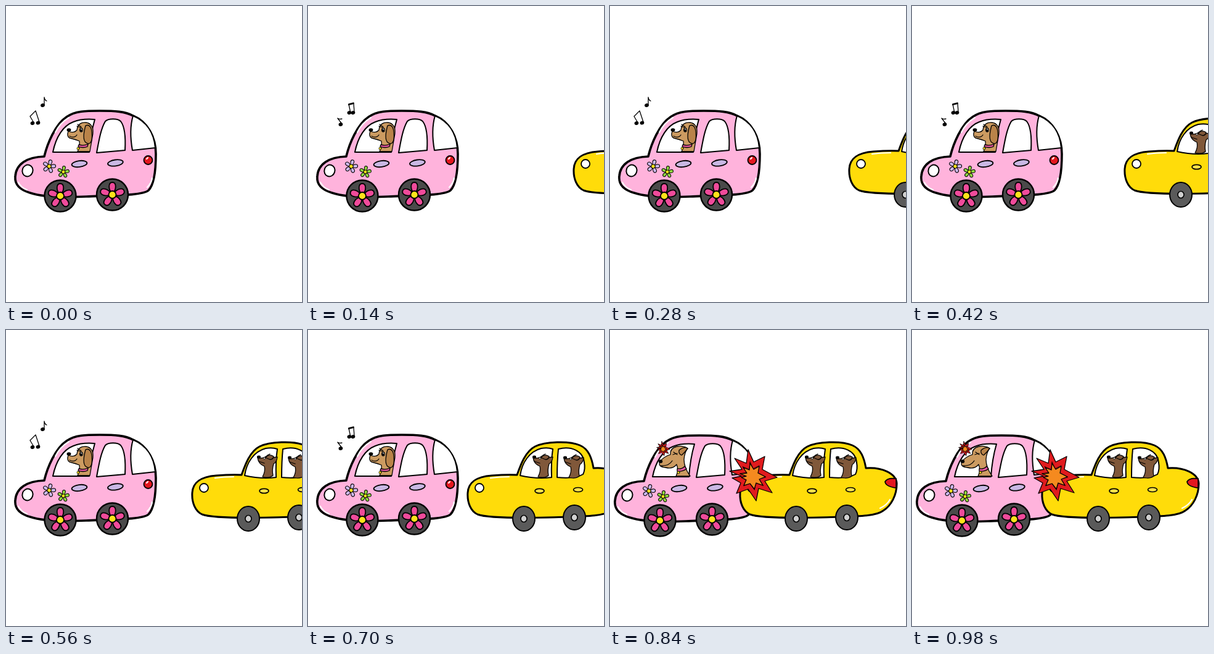
These frames come from a looping animation (480 px wide and 480 px high, 1.12 s). An HTML page:

```html
<!DOCTYPE html>
<html lang="en">
<head>
<meta charset="utf-8">
<title>Little car bump</title>
<style>
html, body { margin: 0; width: 100%; height: 100%; overflow: hidden; background: #fff; }
svg { display: block; width: 100vw; height: 100vh; }
.line { fill: none; }
.shine { fill: none; stroke: #fff; stroke-width: 2.2; }
.glass { fill: #fff; stroke-width: 2; }
</style>
</head>
<body>
<svg viewBox="0 0 480 480" stroke="#000" stroke-width="1.3" stroke-linecap="round" stroke-linejoin="round">
  <defs>
    <g id="petals">
      <path id="petal" d="M0-2C-7-8-7-20 0-20C7-20 7-8 0-2Z"/>
      <use href="#petal" transform="rotate(72)"/>
      <use href="#petal" transform="rotate(144)"/>
      <use href="#petal" transform="rotate(216)"/>
      <use href="#petal" transform="rotate(288)"/>
      <circle r="6" fill="#ffe31a"/>
    </g>
    <g id="flowerWheel">
      <circle r="25.5" fill="#4a4a4a" stroke-width="2.4"/>
      <use href="#petals" fill="#f04b9b" stroke-width="1.8"/>
    </g>
    <g id="plainWheel">
      <ellipse rx="18" ry="20" fill="#5a5a5a" stroke-width="2"/>
      <ellipse rx="5" ry="5.5" fill="#d0d0d0" stroke-width="1.6"/>
    </g>
    <g id="burst">
      <path id="star" fill="#e01b1e" d="M-7-44L2-24 20-33 16-12 40 1 20 7 32 26 10 19 6 39-7 20-26 27-19 10-33 2-18-1-37-9-17-12-29-30-10-22Z"/>
      <use href="#star" transform="scale(.55)" style="--c:#f58220"/>
      <path fill="#f58a1f" d="M-4-22L2-12 11-17 9-6 21 0 11 4 17 14 6 10 3 20-4 11-14 14-10 5-18 1-10-1-20-5-9-6-15-15-5-11Z"/>
    </g>
    <g id="browndog" fill="#80583a">
      <path d="M365 207Q371 209 377 206Q383 201 389 207L397 206Q396 214 391 217Q388 227 390 236Q383 241 373 238Q378 229 376 221Q366 217 365 207Z"/>
      <path d="M378 207Q383 200 391 205Q390 210 385 210Z"/>
      <path class="line" d="M367 213L376 216M381 203L385 201"/>
      <ellipse cx="367" cy="206" rx="2.4" ry="1.8" fill="#000"/>
      <circle cx="376" cy="208" r="1.5" fill="#fff" stroke-width=".8"/>
    </g>
    <g id="note">
      <ellipse cx="0" cy="0" rx="2.8" ry="2.3" fill="#000" transform="rotate(-15)"/>
    </g>
  </defs>

  <g id="notesA" class="line">
    <use href="#note" x="59.5" y="161"/>
    <use href="#note" x="43" y="190"/>
    <use href="#note" x="52" y="189.500"/>
    <path d="M62 161V148Q63 153 66 154M45 189L39 179 48 170 54 188"/>
  </g>
  <g id="notesB" class="line">
    <use href="#note" x="67" y="173"/>
    <use href="#note" x="73" y="173"/>
    <use href="#note" x="53" y="192"/>
    <path d="M69 173L66 159 74 157 75 172M55 191L48 182Q51 184 55 183"/>
    <path d="M66 160L74 158" stroke-width="2"/>
  </g>

  <g id="pink">
    <path fill="#ffb3dc" stroke-width="3.600" d="M15 277C16 256 34 245 62 244C67 223 80 192 98 180C112 170 130 170 152 170C177 170 193 171 206 178C230 188 243 213 243 240C243 269 240 290 231 299C222 307 180 307 130 309C88 311 57 309 39 303C22 298 14 290 15 277Z"/>
    <path class="shine" d="M80 205Q87 190 102 181M229 294Q236 287 237 279M20 286Q25 295 34 298"/>
    <path class="glass" d="M76 237C81 212 93 194 109 188C119 184 132 183 144 184Q137 208 135 237Z"/>
    <path class="glass" d="M147 238C151 216 154 199 161 187C166 182 181 182 186 187C193 196 194 216 193 234Z"/>
    <path class="glass" d="M206 178C227 187 240 205 242 230L205 234C202 217 201 195 206 178Z"/>
    <ellipse cx="35" cy="267" rx="8.500" ry="9.500" fill="#fff" stroke-width="2" transform="rotate(18 35 267)"/>
    <g fill="#c9b8e4" stroke-width="1.800">
      <ellipse cx="119" cy="256" rx="12.500" ry="5" transform="rotate(-8 119 256)"/>
      <ellipse cx="177.500" cy="254.500" rx="12.500" ry="5" transform="rotate(-8 177 255)"/>
    </g>
    <use href="#petals" transform="translate(70 260) rotate(15) scale(.53)" fill="#cdb9ee" stroke-width="2"/>
    <use href="#petals" transform="translate(93 269) rotate(8) scale(.48)" fill="#8fd63f" stroke-width="2"/>
    <circle cx="230.500" cy="250" r="7" fill="#e3171f" stroke-width="1.800"/>
    <path class="shine" d="M228 248L230 246" stroke-width="1.500"/>
    <use href="#flowerWheel" x="88" y="308"/>
    <use href="#flowerWheel" x="172.500" y="306"/>

    <g id="calm" fill="#cc9b61">
      <path d="M101 203Q110 207 115 201C116 191 123 188 130 189C138 190 142 197 141 207L136 236H116Q120 228 119 219Q111 216 103 214Q98 211 101 203Z"/>
      <path fill="#b98349" d="M129 194C136 191 141 198 139 217Q136 227 129 221C124 216 126 205 129 194Z"/>
      <path class="line" d="M103 211Q111 215 115 209M115 195L121 197M116 192L122 196"/>
      <ellipse cx="122" cy="201" rx="2.300" ry="3" fill="#fff"/>
      <circle cx="121.500" cy="201.500" r="1.200" fill="#000"/>
      <ellipse cx="102" cy="201" rx="2.800" ry="2" fill="#000"/>
      <path d="M118 225Q126 227 133 224L132 228Q125 231 117 228Z" fill="#f05aa5"/>
      <circle cx="117" cy="231" r="2" fill="#ffe31a" stroke-width=".8"/>
    </g>
    <g id="hurt" fill="#cc9b61">
      <path d="M88 212Q95 204 105 201Q104 191 115 188Q126 186 133 191Q128 197 127 209Q127 222 137 236H114Q119 227 115 217Q109 225 97 222Q84 221 88 212Z"/>
      <path class="line" d="M90 219Q102 220 108 211M109 201L116 199M110 197L116 201"/>
      <path fill="#b98349" d="M119 194Q127 187 133 191Q127 199 123 202Q118 200 119 194Z"/>
      <ellipse cx="89" cy="212" rx="2.600" ry="2.200" fill="#000"/>
      <path d="M116 224Q124 225 128 220L131 224Q125 229 116 228Z" fill="#f05aa5"/>
      <circle cx="118" cy="230" r="2" fill="#ffe31a" stroke-width=".8"/>
      <use href="#burst" transform="translate(93 192) scale(.28)" stroke-width="3"/>
    </g>
  </g>

  <g id="yellow">
    <path fill="#ffdc0a" stroke-width="3" d="M211 264C212 247 224 238 250 236Q275 234 291 235C296 221 304 197 320 189C336 181 375 179 393 187C407 193 412 207 415 224C440 222 464 232 465 249C465 268 456 285 443 293C430 303 400 302 340 304C290 305 240 304 227 299C216 294 210 280 211 264Z"/>
    <path class="shine" d="M248 240Q262 238 278 238M438 289Q449 284 454 275"/>
    <path fill="#e3171f" stroke-width="1.800" d="M464 241Q450 239 446 246Q447 254 464 256Z"/>
    <path class="glass" d="M296 236C299 215 311 197 330 192Q341 190 349 193Q346 213 347 239Q322 242 296 236Z"/>
    <path class="glass" d="M358 193C378 188 398 195 400 215Q402 226 398 234Q384 242 356 239Q356 212 358 193Z"/>
    <use href="#browndog" x="-48"/>
    <use href="#browndog" x="2" y="1"/>
    <circle cx="230" cy="256" r="7" fill="#fff" stroke-width="1.800"/>
    <g fill="#ffe34a" stroke-width="1.700">
      <ellipse cx="327.500" cy="261" rx="7.500" ry="3.700"/>
      <ellipse cx="390" cy="259" rx="7.500" ry="3.500"/>
    </g>
    <use href="#plainWheel" x="302" y="306"/>
    <use href="#plainWheel" x="384" y="304"/>
  </g>
  <use id="crash" href="#burst" transform="translate(231 238)"/>
</svg>
<script>
const STEP = 140, STEPS = 8, HIT = 6;
const $ = id => document.getElementById(id);
const show = (id, on) => $(id).setAttribute('display', on ? 'inline' : 'none');
const move = (id, x, y) => $(id).setAttribute('transform', `translate(${x} ${y})`);

function draw(now) {
  const step = Math.floor(now / STEP) % STEPS;
  const hit = step >= HIT;
  show('notesA', !hit && step % 2 === 0);
  show('notesB', !hit && step % 2 === 1);
  show('calm', !hit);
  show('hurt', hit);
  show('crash', hit);
  show('yellow', step > 0);
  move('pink', hit ? -7 : 0, hit ? 1 : 0);
  move('yellow', hit ? 0 : 5 + 43 * (HIT - step), 0);
}

const start = performance.now();
function tick() {
  draw(performance.now() - start);
  requestAnimationFrame(tick);
}
tick();
</script>
</body>
</html>
```
